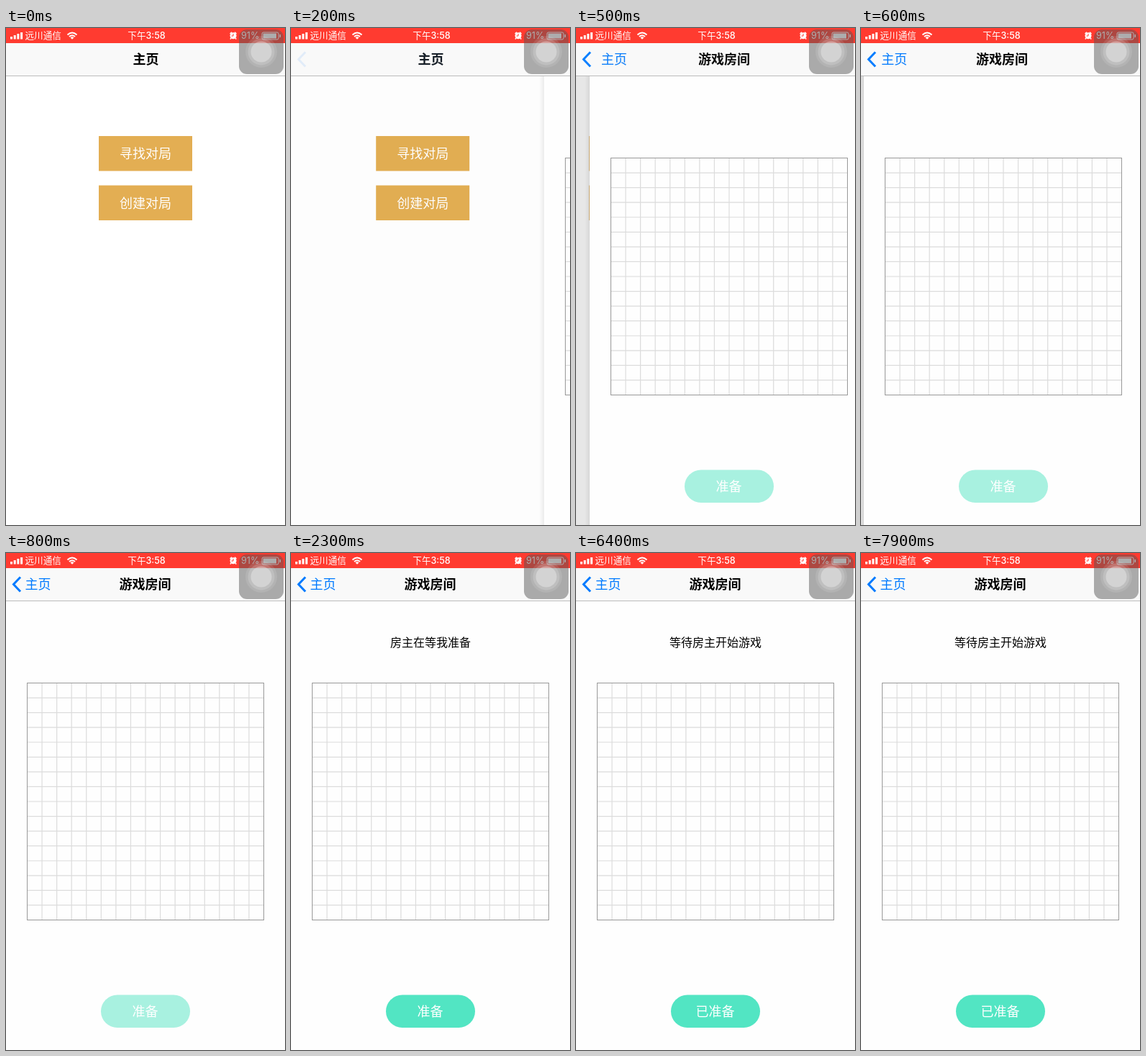
An HTML page for the animation above (8 s loop, 388 by 690 pixels).

```html
<!DOCTYPE html>
<html lang="zh-CN">
<head>
<meta charset="utf-8">
<style>
html, body { margin: 0; width: 100%; height: 100%; overflow: hidden; background: #fff; }
svg { display: block; font: 18px Inter, "Noto Sans CJK SC", "Noto Sans CJK", sans-serif; }
.mid { text-anchor: middle; }
.bold { font-weight: 600; }
.small { font-size: 12.6px; fill: #fff; }
</style>
</head>
<body>
<svg width="388" height="690" viewBox="0 0 388 690">
  <defs>
    <linearGradient id="edge">
      <stop offset="0" stop-opacity="0"/>
      <stop offset="1" stop-opacity=".07"/>
    </linearGradient>
  </defs>

  <g id="home">
    <rect width="388" height="690" fill="#fff"/>
    <path d="M129 150h130v48.500h-130zM129 218.500h130v48.500h-130z" fill="#e3ae53"/>
    <g class="mid" fill="#fff">
      <text x="194" y="181">寻找对局</text>
      <text x="194" y="249.500">创建对局</text>
    </g>
  </g>
  <rect id="dim" width="388" height="690"/>

  <g id="room">
    <rect x="-7" width="7" height="690" fill="url(#edge)"/>
    <rect width="388" height="690" fill="#fefefe"/>
    <path id="grid" fill="none" stroke="#dcdcdc" stroke-width="1.2"/>
    <rect x="29.500" y="180.500" width="329" height="329" fill="none" stroke="#999"/>
    <text id="status" class="mid" x="194" y="129.500" font-size="16"></text>
    <rect id="pill" x="132" y="613.500" width="124" height="45.500" rx="22.750"/>
    <text id="ready" class="mid" x="193.500" y="643" fill="#fff"></text>
  </g>

  <rect width="388" height="66" fill="#f9f9f9"/>
  <path d="M0 66.500H388" stroke="#bcbcbc"/>
  <path id="chevron" d="M20 33.500L10.500 43.500L20 53.500" fill="none" stroke="#007aff" stroke-width="3"/>
  <text id="oldTitle" class="bold" y="50">主页</text>
  <text id="back" y="50" fill="#007aff">主页</text>
  <text id="title" class="mid bold" y="50">游戏房间</text>

  <rect width="388" height="21" fill="#ff3b30"/>
  <path d="M6 12h3v3.500h-3zM10.700 10h3v5.500h-3zM15.400 8h3v7.500h-3zM20.100 6h3v9.500h-3z" fill="#fff"/>
  <text class="small" x="26.500" y="15.200">远川通信</text>
  <g fill="none" stroke="#fff" stroke-width="2">
    <path d="M85.500 9.500Q92 3.500 98.500 9.500M88 12Q92 8.500 96 12"/>
  </g>
  <path d="M89.500 13.200Q92 11.200 94.500 13.200L92 15.800z" fill="#fff"/>
  <text class="small mid" x="195.500" y="15.200" font-weight="500">下午3:58</text>
  <circle cx="316" cy="10.700" r="4.500" fill="#fff"/>
  <path d="M311.500 8L314 5.800M320.500 8L318 5.800M313 14L311.800 15.500M319 14L320.200 15.500" stroke="#fff" stroke-width="1.500"/>
  <path d="M316 8V11H313.500" fill="none" stroke="#ff3b30"/>
  <text class="small" x="327" y="15.200">91%</text>
  <rect x="356" y="6" width="23" height="10" rx="2" fill="none" stroke="#fff"/>
  <path d="M357.500 7.500h18.500v7h-18.500zM380.500 9h1.500v4h-1.500z" fill="#fff"/>

  <rect x="324" y="2" width="62" height="62" rx="11" fill="#555" fill-opacity=".48"/>
  <g fill="#fff">
    <circle cx="355" cy="33" r="22" opacity=".1"/>
    <circle cx="355" cy="33" r="18.500" opacity=".16"/>
    <circle cx="355" cy="33" r="14.500" opacity=".32"/>
  </g>
</svg>
<script>
const el = id => document.getElementById(id);
const set = (id, name, value) => el(id).setAttribute(name, value);

const LOOP = 8000, STEP = 100, WIDTH = 388;
const PUSH = [388, 388, 352, 268, 81, 19, 4, 1, 0]; // left edge of the room page, per step

let lines = '';
for (let i = 1; i < 16; i++) {
  const d = i * 329 / 16;
  lines += `M${29.5 + d} 180.5v329M29.5 ${180.5 + d}h329`;
}
set('grid', 'd', lines);

function draw(t) {
  const left = PUSH[Math.floor(t / STEP)] ?? 0;
  const rest = left / WIDTH, done = 1 - rest;

  set('home', 'transform', `translate(${-116.4 * done})`);
  set('dim', 'opacity', 0.1 * done);
  set('room', 'transform', `translate(${left})`);
  set('room', 'visibility', rest < 1 ? 'visible' : 'hidden');

  const labelX = 26.5 + Math.min(150, 172 * rest);
  set('oldTitle', 'x', labelX);
  set('oldTitle', 'opacity', rest);
  set('back', 'x', labelX);
  set('back', 'opacity', done);
  set('chevron', 'opacity', done);
  set('title', 'x', 193.5 + 254 * rest);
  set('title', 'opacity', done);

  const joined = t >= 1500, pressed = t >= 5300 && t < 5400, ready = t >= 5400;
  set('pill', 'fill', pressed ? '#2a7865' : joined ? '#52e5c3' : '#a8f1e0');
  el('ready').textContent = ready ? '已准备' : '准备';
  el('status').textContent = ready ? '等待房主开始游戏' : joined ? '房主在等我准备' : '';
}

const start = performance.now();
function tick() {
  draw((performance.now() - start) % LOOP);
  requestAnimationFrame(tick);
}
tick();
</script>
</body>
</html>
```
